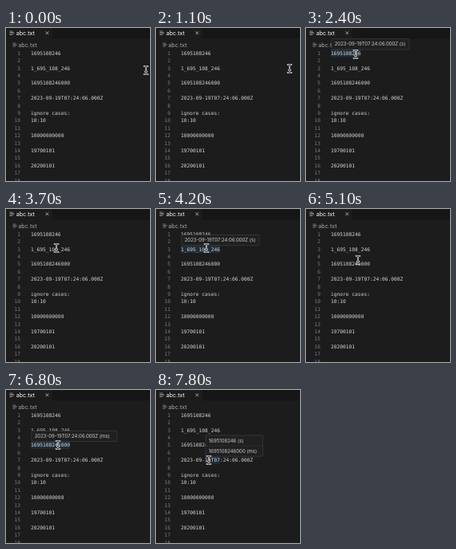
These frames come from a looping animation (180 by 192 pixels, 8000 ms). An HTML page:

```html
<!DOCTYPE html>
<html lang="en">
<head>
<meta charset="utf-8">
<title>Timestamp hover</title>
<style>
  html, body { margin: 0; width: 100%; height: 100%; overflow: hidden; background: #1c1c1d; }
  svg { display: block; width: 180px; height: 192px; }
  text { white-space: pre; }
  .code { font: 6.25px "DejaVu Sans Mono", monospace; fill: #d4d4d4; }
  .num { font: 6.25px "DejaVu Sans Mono", monospace; fill: #7c7c7e; text-anchor: end; }
  .ui { font: 7.2px Inter, sans-serif; fill: #a9a9a9; }
  .tab { font-size: 7.1px; fill: #fff; }
  .tip { font: 6px Inter, sans-serif; fill: #cccccc; }
</style>
</head>
<body>
<svg id="stage" viewBox="0 0 180 192">
  <rect width="180" height="192" fill="#1c1c1d"/>
  <rect x="58" width="122" height="13.5" fill="#161617"/>
  <path d="M4.5 4h4M4.5 5.5h5.5M4.5 7h5.5M4.5 8.5h3.5" stroke="#c5c5c5" stroke-width=".6"/>
  <text class="ui tab" x="12.8" y="8.6">abc.txt</text>
  <path d="M49.6 4.4l3.6 3.6m0-3.6l-3.6 3.6" stroke="#e0e0e0" stroke-width=".7"/>
  <path d="M8.5 19h3.6M8.5 20.4h5M8.5 21.8h5M8.5 23.2h3.2" stroke="#a0a0a0" stroke-width=".6"/>
  <text class="ui" x="15.3" y="23.5">abc.txt</text>
  <g id="marks"></g>
  <g id="lines"></g>
  <g id="tips"></g>
  <g id="cursor" fill="none" stroke-linecap="round" stroke-linejoin="round">
    <path d="M-2.3-5Q-.4-5 0-4Q.4-5 2.3-5M0-4V4M-2.3 5Q-.4 5 0 4Q.4 5 2.3 5M-1.2 1.8H1.2" stroke="#fff" stroke-width="2"/>
    <path d="M-2.3-5Q-.4-5 0-4Q.4-5 2.3-5M0-4V4M-2.3 5Q-.4 5 0 4Q.4 5 2.3 5M-1.2 1.8H1.2" stroke="#111" stroke-width=".8"/>
  </g>
</svg>
<script>
const LOOP = 8000, STEP = 100;
const LEFT = 31, CHAR = 3.763, ROW = 9.4, TIP_ROW = 13.2;
const rowY = n => 31.5 + (n - 1) * ROW;
const $ = id => document.getElementById(id);

function add(parent, tag, attrs, text) {
  const el = document.createElementNS("http://www.w3.org/2000/svg", tag);
  for (const key in attrs) el.setAttribute(key, attrs[key]);
  if (text) el.textContent = text;
  parent.appendChild(el);
  return el;
}

const code = {
  1: "1695108246",
  3: "1_695_108_246",
  5: "1695108246000",
  7: "2023-09-19T07:24:06.000Z",
  9: "ignore cases:",
  10: "10:10",
  12: "10000000000",
  14: "19700101",
  16: "20200101"
};

for (let n = 1; n <= 18; n++) {
  const y = rowY(n) + 2.25;
  add($("lines"), "text", { class: "num", x: 18, y }, String(n));
  if (code[n]) add($("lines"), "text", { class: "code", x: LEFT, y }, code[n]);
}

// Each hover marks a word and opens a box whose rows stack above the line.
const iso = "2023-09-19T07:24:06.000Z";
const hovers = [
  { row: 1, col: 0, len: 10, from: 2400, to: 3500, fade: 0, width: 97, rows: [iso + " (s)"] },
  { row: 3, col: 0, len: 13, from: 4000, to: 4900, fade: 200, width: 97, rows: [iso + " (s)"] },
  { row: 5, col: 0, len: 13, from: 6100, to: 6900, fade: 200, width: 107, rows: [iso + " (ms)"] },
  { row: 7, col: 8, len: 5, from: 7600, to: 8000, fade: 200, width: 71.5,
    rows: ["1695108246 (s)", "1695108246000 (ms)"] }
];

for (const h of hovers) {
  const x = LEFT + h.col * CHAR, bottom = rowY(h.row) - 4.6;
  const height = h.rows.length * TIP_ROW, top = bottom - height;
  h.mark = add($("marks"), "rect", {
    x, y: bottom, width: h.len * CHAR, height: ROW, fill: "#202d39"
  });
  h.tip = add($("tips"), "g", {});
  add(h.tip, "rect", {
    x: x + 1, y: top, width: h.width, height,
    rx: 1, fill: "#202021", stroke: "#434344", "stroke-width": .6
  });
  h.rows.forEach((row, i) => {
    const y = top + i * TIP_ROW;
    if (i) add(h.tip, "path", { d: `M${x + 1} ${y}h${h.width}`, stroke: "#363637", "stroke-width": .5 });
    add(h.tip, "text", { class: "tip", x: x + 4.7, y: y + 8.7 }, row);
  });
}

// Pointer path: time, x, y
const path = [
  [0, 175, 53], [1000, 175, 53], [1100, 167, 51], [1200, 143, 46], [1300, 112, 40],
  [1400, 87, 36], [1500, 73, 34], [1800, 62, 33], [3200, 62, 33], [3500, 62.5, 44],
  [3700, 63, 49], [4700, 63, 49], [5100, 65, 64], [5400, 65, 68], [5700, 65, 69],
  [6800, 65, 69], [7000, 65.5, 80], [7300, 66, 88], [8000, 66, 88]
];

function pointer(t) {
  const i = path.findIndex(p => p[0] > t);
  const [t0, x0, y0] = path[i - 1], [t1, x1, y1] = path[i];
  const k = (t - t0) / (t1 - t0);
  return [x0 + (x1 - x0) * k, y0 + (y1 - y0) * k];
}

function draw(time) {
  const t = Math.floor(time % LOOP / STEP) * STEP;
  $("cursor").setAttribute("transform", `translate(${pointer(t)})`);
  for (const h of hovers) {
    const on = t >= h.from && t < h.to;
    const shown = h.fade ? Math.min(1, .4 + .6 * (t - h.from) / h.fade) : 1;
    h.mark.setAttribute("opacity", on ? 1 : 0);
    h.tip.setAttribute("opacity", on ? shown : 0);
  }
}

const start = performance.now();
function frame() {
  draw(performance.now() - start);
  requestAnimationFrame(frame);
}
frame();
</script>
</body>
</html>
```
